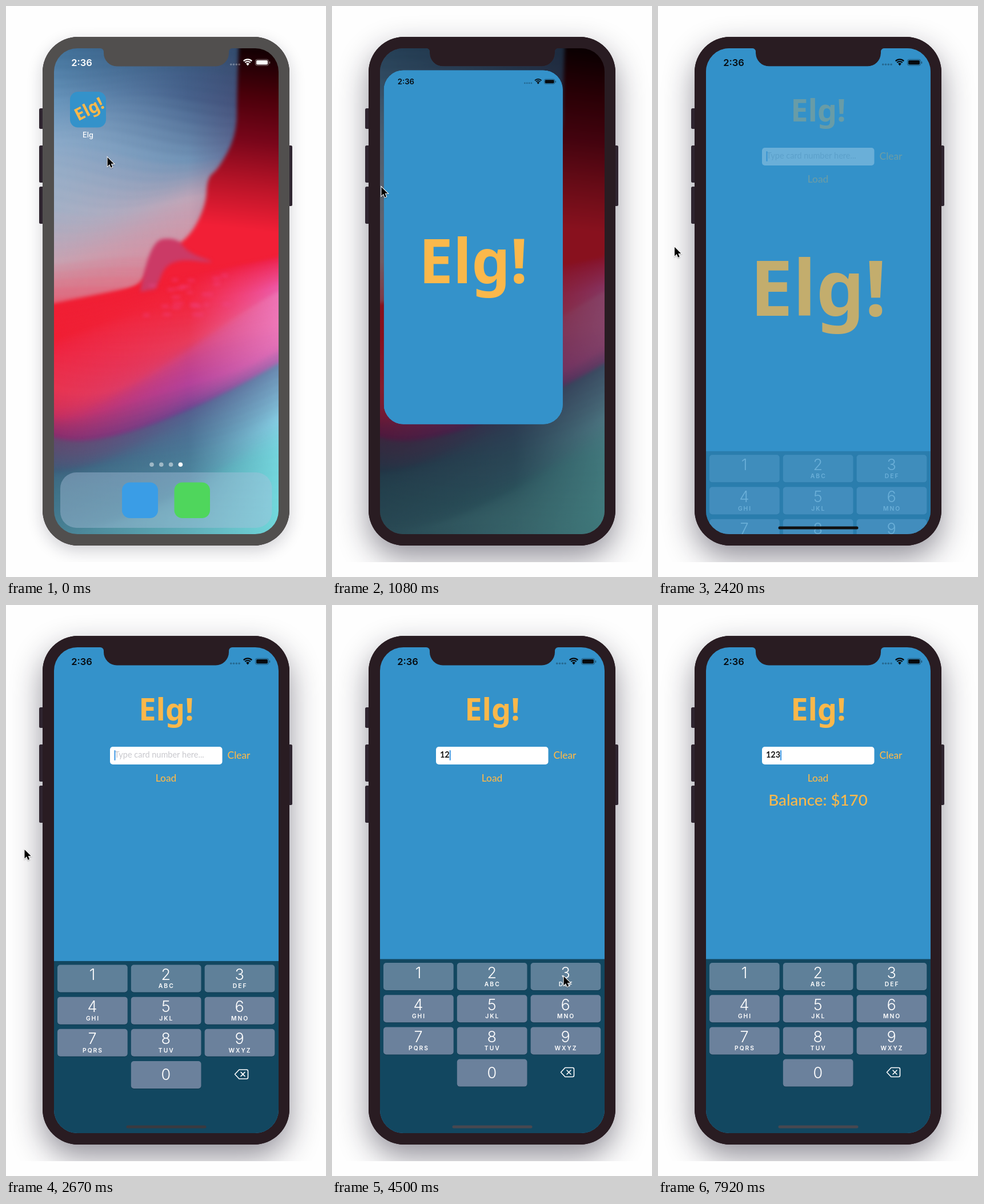
Recreate the animation shown at these times as an HTML page with a canvas. Size 560x999 px, loop 9.25 s.

```html
<!DOCTYPE html>
<html lang="en">
<head>
<meta charset="utf-8">
<title>Card balance demo</title>
<style>
html, body { margin: 0; width: 100%; height: 100%; overflow: hidden; background: #fefefe; }
canvas { display: block; width: 560px; height: 999px; }
</style>
</head>
<body>
<canvas id="stage"></canvas>
<script>
const W = 560, H = 999, LOOP = 9250, STEP = 1000 / 12;
const BRAND = 'Elg';
const BLUE = '#3492ca', ORANGE = '#fab84b', DARK = '#291c22';
const SYSTEM = 'Inter, sans-serif', HUMAN = 'Lato, sans-serif', TITLE = '"Noto Sans", sans-serif';
const SCREEN = { x: 84, y: 74, w: 393, h: 850 };
const ICON = { x: 112, y: 150, w: 63, h: 62.5 };
const PRESSES = [3570, 4160, 4570];   // keys 1, 2 and 3
const LOAD = 5660, ANSWER = 6660;

const canvas = document.getElementById('stage');
const dpr = window.devicePixelRatio || 1;
canvas.width = W * dpr;
canvas.height = H * dpr;
const ctx = canvas.getContext('2d');

const clamp = v => Math.min(1, Math.max(0, v));
const lerp = (a, b, p) => a + (b - a) * p;
const ramp = (t, a, b) => clamp((t - a) / (b - a));
const smooth = p => p * p * (3 - 2 * p);

function box(c, x, y, w, h, r, fill) {
  c.beginPath();
  c.roundRect(x, y, w, h, r);
  c.fillStyle = fill;
  c.fill();
}

function text(str, x, y, font, fill, align = 'center', spacing = 0) {
  ctx.font = font;
  ctx.fillStyle = fill;
  ctx.textAlign = align;
  ctx.letterSpacing = spacing + 'px';
  ctx.fillText(str, x, y);
  ctx.letterSpacing = '0px';
}

function withAlpha(a, draw) {
  if (a <= 0) return;
  const old = ctx.globalAlpha;
  ctx.globalAlpha = old * a;
  draw();
  ctx.globalAlpha = old;
}

// ---- wallpaper: wavy layers whose colours run along three vertical palettes ----
const channels = hex => [0, 2, 4].map(i => parseInt(hex.slice(i, i + 2), 16));

function mix(palette, k) {
  const stops = palette.split(' '), at = k * (stops.length - 1);
  const i = Math.min(Math.floor(at), stops.length - 2);
  const a = channels(stops[i]), b = channels(stops[i + 1]);
  return `rgb(${a.map((v, j) => Math.round(lerp(v, b[j], at - i)))})`;
}

function strata(c, top, bottom, left, middle, right, count = 30) {
  for (let i = 0; i <= count; i++) {
    const k = i / count, g = c.createLinearGradient(84, 0, 477, 0);
    g.addColorStop(0, mix(left, k));
    g.addColorStop(.6, mix(middle, k));
    g.addColorStop(1, mix(right, k));
    c.fillStyle = g;
    c.beginPath();
    c.moveTo(60, 960);
    for (let x = 60; x <= 500; x += 8) {
      const u = clamp((x - 84) / 393);
      const wave = 16 * Math.sin(Math.PI * k) * Math.sin(u * 6 + i * .35);
      c.lineTo(x, lerp(top(u), bottom(u), k) + wave);
    }
    c.lineTo(500, 960);
    c.fill();
  }
}

function curve(c, points, fill) {
  c.beginPath();
  c.moveTo(...points[0]);
  for (let i = 1; i < points.length - 1; i++) {
    const [x, y] = points[i], [nx, ny] = points[i + 1];
    c.quadraticCurveTo(x, y, (x + nx) / 2, (y + ny) / 2);
  }
  c.lineTo(...points[points.length - 1]);
  c.fillStyle = fill;
  c.fill();
}

function makeWallpaper() {
  const layer = document.createElement('canvas');
  layer.width = W;
  layer.height = H;
  const c = layer.getContext('2d');
  const floor = u => 520 - 80 * u;
  const shore = u => 772 - 147 * u ** 1.6 - 17 * (1 - u) ** 8;

  c.filter = 'blur(3px)';
  strata(c, u => 60, u => 525,
    '3f6f98 6a97bd 8aa9c8 a2b0c6 c7a3b2 e65a70',
    '36557a 46608a 7193b6 c0a6b8 d58fa2 e65a70',
    '2c4260 45476f 53497a 8d6a8c b04a6c e65a70');

  const cliff = c.createLinearGradient(450, 80, 415, 390);
  ['#140003', '#4a000a', '#78061a', '#b81428', '#f21f36']
    .forEach((s, i) => cliff.addColorStop(i / 4, s));
  curve(c, [[408, 50], [404, 150], [404, 225], [372, 285], [352, 300], [350, 350], [318, 410],
    [262, 436], [230, 500], [84, 530], [500, 560], [500, 50]], cliff);

  strata(c, floor, shore,
    'f01f34 f01f34 ef2440 e83450 c42f60 802e70',
    'f21f36 f2263e e83c5c d4437c b4429a 624890',
    'ee2450 ee58a6 ee72b4 ee78b8 e070b8 a868b0');
  strata(c, shore, u => 960,
    '64486f 3d5f7c 3f7288 4a8296 3f7488',
    '55608f 4a7896 4c90a2 5fabb6 62b4c0',
    '6a8ab0 86cce2 74d4dc 72d8dc 6ccfd4');

  curve(c, [[235, 500], [250, 410], [300, 405], [318, 432], [378, 452], [285, 440], [262, 495]], '#cb3a66');
  let seed = 7;
  const random = () => (seed = seed * 16807 % 2147483647) / 2147483647;
  for (let i = 0; i < 22; i++)
    box(c, 240 + random() * 150, 465 + random() * 80, 8 + random() * 12, 4, 2, 'rgba(238,70,140,.55)');
  return layer;
}
const wallpaper = makeWallpaper();

// ---- phone shell ----
function drawShell(active) {
  ctx.save();
  ctx.beginPath();
  ctx.rect(0, 0, W, 973);
  ctx.clip();
  ctx.shadowColor = active ? 'rgba(22,18,38,.46)' : 'rgba(22,18,38,.2)';
  ctx.shadowBlur = (active ? 54 : 28) * dpr;
  ctx.shadowOffsetY = (active ? 22 : 9) * dpr;
  box(ctx, 64, 54, 432, 890, 62, DARK);
  ctx.restore();
  for (const [x, y, h] of [[58, 179, 36], [58, 244, 65], [58, 316, 65], [493, 244, 106]])
    box(ctx, x, y, 8, h, 2.5, '#2f2530');
  box(ctx, 64, 54, 432, 890, 62, active ? DARK : '#514f4e');
}

function clipScreen() {
  const { x, y, w, h } = SCREEN, r = 41, right = x + w, bottom = y + h;
  ctx.beginPath();
  ctx.moveTo(x + r, y);
  ctx.lineTo(165, y);
  ctx.arcTo(171, y, 171, y + 6, 6);
  ctx.arcTo(171, 105.5, 195, 105.5, 23);
  ctx.arcTo(390, 105.5, 390, 82, 23);
  ctx.arcTo(390, y, 396, y, 6);
  ctx.arcTo(right, y, right, bottom, r);
  ctx.arcTo(right, bottom, x, bottom, r);
  ctx.arcTo(x, bottom, x, y, r);
  ctx.arcTo(x, y, right, y, r);
  ctx.clip();
}

function drawStatus(color) {
  text('2:36', 132.5, 104.5, '600 16.5px ' + SYSTEM, color);
  withAlpha(.3, () => {
    for (let i = 0; i < 4; i++) box(ctx, 392 + i * 4.8, 100.5, 3.4, 3.4, 1.7, color);
  });
  ctx.strokeStyle = color;
  ctx.lineWidth = 2.2;
  for (const r of [10.2, 6.6]) {
    ctx.beginPath();
    ctx.arc(423, 103.6, r, -Math.PI * .75, -Math.PI * .25);
    ctx.stroke();
  }
  ctx.fillStyle = color;
  ctx.beginPath();
  ctx.moveTo(423, 104.6);
  ctx.arc(423, 103.8, 4, -Math.PI * .75, -Math.PI * .25);
  ctx.fill();
  withAlpha(.45, () => {
    ctx.lineWidth = 1;
    ctx.beginPath();
    ctx.roundRect(436.5, 93.5, 23, 10.5, 3);
    ctx.stroke();
    box(ctx, 460.7, 97, 1.5, 4, 1, color);
  });
  box(ctx, 438, 95, 20, 7.5, 1.8, color);
}

// ---- home screen ----
function iconText(cx, cy, scale) {
  ctx.save();
  ctx.translate(cx, cy);
  ctx.scale(scale, scale);
  ctx.rotate(-.47);
  text(BRAND + '!', 0, 9, '800 30px ' + TITLE, ORANGE);
  ctx.restore();
}

function drawHome(t, p) {
  ctx.drawImage(wallpaper, 0, 0);
  withAlpha(1 - clamp(p * 2 - .2), () => {
    drawStatus('#fff');
    text(BRAND, 143.5, 229.5, '500 12.8px ' + SYSTEM, '#fff');
    for (let i = 0; i < 4; i++)
      box(ctx, 251.2 + i * 16.8, 798.5, 7.6, 7.6, 3.8, i < 3 ? 'rgba(255,255,255,.48)' : '#fff');
    box(ctx, 95, 816, 370.5, 97, 28, 'rgba(170,190,220,.42)');
    box(ctx, 203, 833.5, 63, 62.5, 14, '#3a9de6');
    box(ctx, 294.5, 833.5, 62.5, 62.5, 14, '#4fd65c');
  });
  if (p === 0) {
    box(ctx, ICON.x, ICON.y, ICON.w, ICON.h, 14, BLUE);
    iconText(146, 181.5, 1);
    if (t > 660) box(ctx, ICON.x, ICON.y, ICON.w, ICON.h, 14, 'rgba(0,0,0,.4)');
  } else {
    ctx.fillStyle = `rgba(0,0,0,${.58 * p})`;
    ctx.fillRect(SCREEN.x, SCREEN.y, SCREEN.w, SCREEN.h);
  }
}

// ---- app ----
function fillScreen() {
  ctx.fillStyle = BLUE;
  ctx.fillRect(SCREEN.x, SCREEN.y, SCREEN.w, SCREEN.h);
}

function drawKeyboard(t, offset) {
  ctx.save();
  ctx.translate(0, offset);
  ctx.fillStyle = '#124760';
  ctx.fillRect(84, 619.5, 393, 306);
  const letters = ['', 'ABC', 'DEF', 'GHI', 'JKL', 'MNO', 'PQRS', 'TUV', 'WXYZ', ''];
  letters.forEach((label, i) => {
    const col = i === 9 ? 1 : i % 3, row = Math.floor(i / 3);
    const x = 90 + col * 128.8, y = 626 + row * 56.2, cx = x + 61;
    const held = t > PRESSES[i] && t < PRESSES[i] + STEP;
    box(ctx, x, y + 1, 122.7, 48, 5, '#0e3a50');
    box(ctx, x, y, 122.7, 48, 5, held ? '#3c6079' : row ? '#6b819c' : '#5f8099');
    text((i + 1) % 10, cx, y + (i === 9 ? 33 : 26.5), '300 27px ' + SYSTEM, '#fff');
    text(label, cx + 1, y + 41, '600 10.3px ' + SYSTEM, '#fff', 'center', 2);
  });
  ctx.strokeStyle = '#fff';
  ctx.lineWidth = 1.6;
  ctx.lineJoin = ctx.lineCap = 'round';
  ctx.stroke(new Path2D('M400.5 817.5L408 809.5H421Q423.5 809.5 423.5 812V823Q423.5 825.5 421 825.5H408Z' +
    'M411 814L418 821M418 814L411 821'));
  ctx.restore();
}

function drawSpinner(t) {
  const lead = Math.round(t / STEP) + 1;
  ctx.save();
  ctx.translate(280, 348);
  ctx.strokeStyle = '#fff';
  ctx.lineCap = 'round';
  ctx.lineWidth = 3.6;
  for (let i = 0; i < 12; i++) {
    const age = (lead - i) % 12;
    withAlpha(Math.max(.33, 1 - age * .13), () => {
      ctx.beginPath();
      ctx.moveTo(0, -10);
      ctx.lineTo(0, -16.6);
      ctx.stroke();
    });
    ctx.rotate(Math.PI / 6);
  }
  ctx.restore();
}

function caretAlpha(t) {
  if (t < 4900 || t > 7900) return 1;
  const m = t % 1000;
  return 1 - ramp(m, 170, 410) + ramp(m, 700, 900);
}

function drawForm(t) {
  text(BRAND + '!', 280.5, 202, '800 54px ' + TITLE, ORANGE);
  box(ctx, 182, 248, 196.5, 31, 5, '#fff');
  const typed = '123'.slice(0, PRESSES.filter(at => t > at).length);
  if (typed) text(typed, 189, 267, '700 14.4px ' + HUMAN, '#111', 'left');
  else text('Type card number here...', 190, 267, '400 14.5px ' + HUMAN, '#c8c8cd', 'left');
  const caretX = typed ? 189 + ctx.measureText(typed).width : 189.5;
  withAlpha(caretAlpha(t), () => box(ctx, caretX, 254, 2, 18, 1, '#3b96e3'));
  text('Clear', 407.5, 269, '500 17.3px ' + HUMAN, ORANGE);
  const press = t > LOAD ? lerp(.35, 1, ramp(t, LOAD, LOAD + 340)) : 1;
  withAlpha(press, () => text('Load', 280, 309, '500 17.3px ' + HUMAN, ORANGE));
  if (t > LOAD + STEP && t < ANSWER) drawSpinner(t);
  if (t > ANSWER) text('Balance: $170', 280, 351, '500 27.7px ' + HUMAN, ORANGE);
}

function drawApp(t) {
  const p = ramp(t, 2333, 2642);
  fillScreen();
  if (p > 0) {
    drawForm(t);
    drawKeyboard(t, 305 * (1 - ramp(t, 2333, 2763)) ** 3);
  }
  // The splash fades away as one sheet over the form
  withAlpha(1 - p, fillScreen);
  withAlpha(1 - p, () => text(BRAND + '!', 280.5, 542, '800 134px ' + TITLE, ORANGE));
  drawStatus('#060a0e');
  const shade = [72, 72, 80].map(v => lerp(16, v, ramp(t, 2417, 2750)));
  box(ctx, 210.5, 910.5, 140, 5, 2.5, `rgb(${shade})`);
}

// Critically damped growth from the icon to the full screen
function launchProgress(t) {
  if (t < 910) return 0;
  if (t > 1660) return 1;
  const s = (t - 902) * .01508;
  return 1 - (1 + s) * Math.exp(-s);
}

function drawLaunch(t, p) {
  const w = lerp(ICON.w, SCREEN.w, p), h = lerp(ICON.h, SCREEN.h, p ** 1.25);
  const cx = lerp(143.5, 280.5, p), cy = lerp(181.5, 499, p);
  const x = cx - w / 2, y = cy - h / 2, k = w / SCREEN.w, fade = ramp(p, .1, .45);
  ctx.save();
  ctx.beginPath();
  ctx.roundRect(x, y, w, h, lerp(14, 41, p));
  ctx.clip();
  ctx.fillStyle = BLUE;
  ctx.fillRect(x, y, w, h);
  withAlpha(1 - fade, () => iconText(cx + 2, cy, w / ICON.w));
  withAlpha(fade, () => {
    ctx.translate(x, y);
    ctx.scale(k, k);
    ctx.translate(-SCREEN.x, -SCREEN.y);
    drawApp(t);
  });
  ctx.restore();
}

// ---- pointer: each move is [leave, arrive, x, y] ----
const moves = [
  [167, 500, 155, 194],
  [833, 917, 143, 211],
  [917, 1250, 28.5, 421],
  ...PRESSES.map((at, i) =>
    [(PRESSES[i - 1] || 2410) + 170, at - STEP, 161 + 122 * i, 658 - 4.5 * i]),
  [4750, 5417, 288, 310],
  [5917, 6500, 488, 300]
];

function drawPointer(t) {
  if (t > 6570) return;
  let x = 177, y = 264;
  for (const [leave, arrive, toX, toY] of moves) {
    const p = smooth(ramp(t, leave, arrive));
    x = lerp(x, toX, p);
    y = lerp(y, toY, p);
  }
  const arrow = new Path2D('M.6.8V16.4L4.2 13L6.6 18.8L9.2 17.7L6.8 12H11.8Z');
  ctx.save();
  ctx.translate(x, y);
  ctx.shadowColor = 'rgba(0,0,0,.3)';
  ctx.shadowBlur = 2 * dpr;
  ctx.shadowOffsetY = dpr;
  ctx.lineWidth = 2;
  ctx.lineJoin = 'miter';
  ctx.strokeStyle = '#fff';
  ctx.stroke(arrow);
  ctx.shadowColor = 'transparent';
  ctx.fillStyle = '#000';
  ctx.fill(arrow);
  ctx.restore();
}

function render(now) {
  const t = Math.floor((now % LOOP + 4) / STEP) * STEP;
  const p = launchProgress(t);
  ctx.setTransform(dpr, 0, 0, dpr, 0, 0);
  ctx.fillStyle = '#fefefe';
  ctx.fillRect(0, 0, W, H);
  drawShell(t > 75);
  ctx.save();
  clipScreen();
  if (p < 1) drawHome(t, p);
  if (p === 1) drawApp(t);
  else if (p > 0) drawLaunch(t, p);
  ctx.restore();
  drawPointer(t);
}

const start = performance.now();
function tick() {
  render(performance.now() - start);
  requestAnimationFrame(tick);
}
tick();
</script>
</body>
</html>
```
